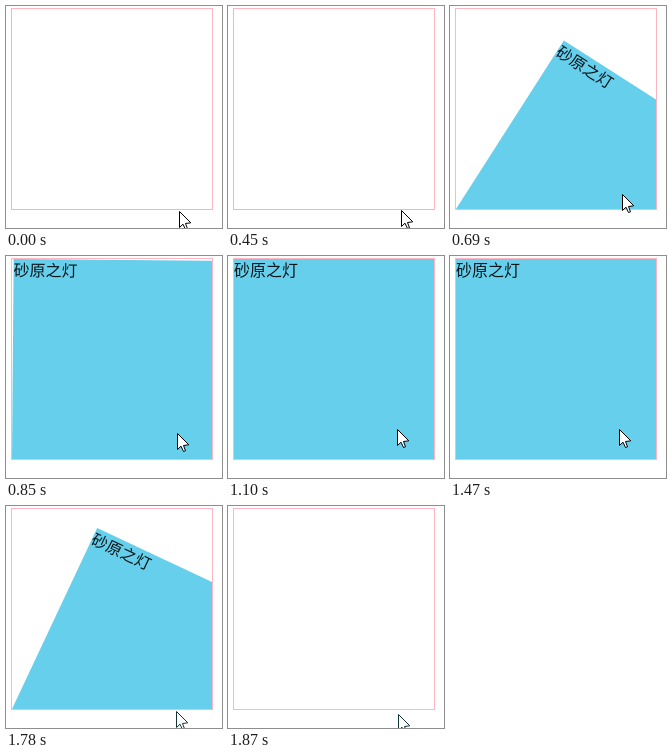
An HTML page with a canvas that plays this animation: 216x222 px, repeating every 2880 ms.

```html
<!DOCTYPE html>
<html lang="zh">
<head>
<meta charset="utf-8">
<style>
html, body { margin: 0; width: 100%; height: 100%; overflow: hidden; background: #fff; }
canvas { display: block; width: 216px; height: 222px; }
</style>
</head>
<body>
<canvas id="stage" width="216" height="222"></canvas>
<script>
const ctx = document.getElementById('stage').getContext('2d');
const LOOP = 2880, TURN = 300, ENTER = 579, LEAVE = 1722, HIDDEN = 1870;
const BOX = { x: 6, y: 3, size: 200 };

// The picture only refreshes during these bursts.
const bursts = [
  { from: 0, to: 0, step: 1 },
  { from: 450, to: 930, step: 80 },
  { from: 1000, to: 1100, step: 100 },
  { from: 1470, to: 1780, step: 77.5 },
  { from: HIDDEN, to: HIDDEN, step: 1 }
];

function hold(t) {
  const { from, to, step } = bursts.filter(b => b.from <= t).pop();
  return Math.min(to, from + Math.floor((t - from) / step) * step);
}

const ramp = (t, a, b) => Math.min(1, Math.max(0, (t - a) / (b - a)));
const bezier = (a, b, s) => 3 * a * s * (1 - s) ** 2 + 3 * b * s * s * (1 - s) + s ** 3;

// CSS "ease": cubic-bezier(.25, .1, .25, 1)
function ease(p) {
  let lo = 0, hi = 1;
  for (let i = 0; i < 24; i++) {
    const mid = (lo + hi) / 2;
    if (bezier(0.25, 0.25, mid) < p) lo = mid; else hi = mid;
  }
  return bezier(0.1, 1, lo);
}

function angleAt(t) {
  if (t < ENTER || t >= HIDDEN) return 90;
  const opened = ease(ramp(t, ENTER, ENTER + TURN));
  const closed = ease(ramp(t, LEAVE, LEAVE + TURN));
  return 90 * (1 - opened + closed);
}

// Up into the box, a small settle, then back out below it.
function pointerAt(t) {
  const x = 173 - 4 * ramp(t, 450, 1100) + ramp(t, 1470, 1780);
  const y = 205 - ramp(t, 0, 450) - 32 * ramp(t, 450, 930)
    - 3 * ramp(t, 930, 1000) + 4 * ramp(t, 1000, 1100)
    + 32 * ramp(t, 1470, 1780) + 3 * ramp(t, 1780, HIDDEN);
  return [Math.round(x), Math.round(y)];
}

function drawBorder(t) {
  const { x, y, size } = BOX;
  ctx.fillStyle = '#ffb6c1';
  ctx.fillRect(x - 1, y - 1, size + 2, 1);
  ctx.fillRect(x + size, y, 1, size + 1);
  ctx.fillStyle = t < ENTER ? '#d3c4c5' : '#f6bcc4';
  ctx.fillRect(x - 1, y, 1, size + 1);
  ctx.fillRect(x - 1, y + size, size + 1, 1);
}

function drawPanel(angle) {
  const { x, y, size } = BOX;
  ctx.save();
  ctx.beginPath();
  ctx.rect(x, y, size, size);
  ctx.clip();
  ctx.translate(x, y + size);
  ctx.rotate(angle * Math.PI / 180);
  ctx.fillStyle = '#66cfec';
  ctx.fillRect(0, -size, size, size);
  ctx.fillStyle = '#0a1519';
  ctx.font = '16px "Noto Sans CJK SC", "Noto Sans CJK", sans-serif';
  ctx.fillText('砂原之灯', 0, 17 - size);
  ctx.restore();
}

const arrow = [[0, 0], [0, 16], [3.5, 12.7], [6, 18], [8, 17.3], [6, 12], [11.3, 11.3]];

function drawPointer(t) {
  const [x, y] = pointerAt(t);
  ctx.beginPath();
  arrow.forEach(([dx, dy]) => ctx.lineTo(x + dx + 0.5, y + dy + 0.5));
  ctx.closePath();
  ctx.fillStyle = '#fff';
  ctx.fill();
  ctx.lineJoin = 'round';
  ctx.strokeStyle = t >= LEAVE ? '#123434' : '#000';
  ctx.stroke();
}

function draw(now) {
  const t = hold(now % LOOP);
  ctx.fillStyle = '#fff';
  ctx.fillRect(0, 0, 216, 222);
  drawBorder(t);
  const angle = angleAt(t);
  if (angle < 90) drawPanel(angle);
  drawPointer(t);
}

const start = performance.now();
function tick() {
  draw(performance.now() - start);
  requestAnimationFrame(tick);
}
tick();
</script>
</body>
</html>
```
